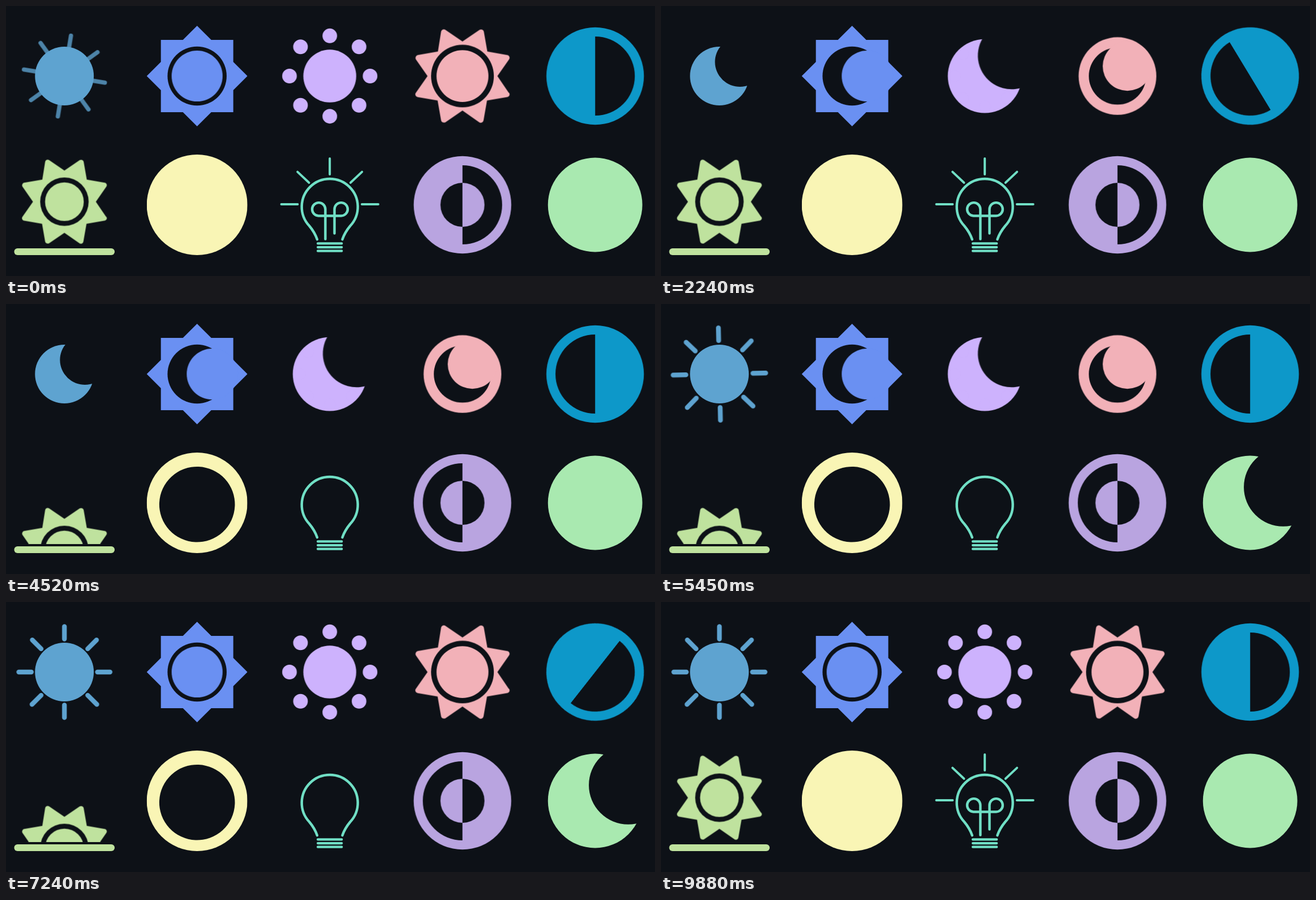
Write an HTML page that moves like this. It is 1147x478 px and loops after 10000 ms.

```html
<!DOCTYPE html>
<html lang="en">
<head>
<meta charset="utf-8">
<title>Theme toggles</title>
<style>
  html, body { margin: 0; width: 100%; height: 100%; overflow: hidden; background: #0d1117; }
  svg { display: block; fill: currentColor; }

  /* Each icon switches on at 0% of its own cycle and off at 50.2%. */
  .icon { --lead: 22ms; --ease: ease; }
  .icon * { transform-origin: 16px 16px; }
  .swap, .early, .late, .grow, .shade, .draw {
    animation: swap 10s var(--ease) calc(var(--i) * 500ms - 10s - var(--lead)) infinite;
  }
  .early { animation-name: early; }
  .late { animation-name: late; }
  .grow { animation-name: grow; }
  .shade { animation-name: shade; }
  .draw { animation-name: draw; }

  @keyframes swap {
    0%, 55.2%, 100% { transform: var(--off, none); }
    5%, 50.2% { transform: var(--on); }
  }
  @keyframes early {
    0%, 51.2%, 55.2%, 100% { transform: none; opacity: 1; }
    0% { transform: none; opacity: 1; }
    4%, 50.2% { transform: var(--on); opacity: 0; }
    51.2% { transform: var(--on); opacity: 0; }
  }
  @keyframes late {
    0%, 1%, 54.2%, 100% { transform: none; }
    5%, 50.2% { transform: var(--on); }
  }
  @keyframes grow {
    0%, 55.2%, 100% { transform: none; }
    3.25%, 51.95% { transform: var(--on); }
  }
  @keyframes shade {
    0%, 2%, 53.2%, 100% { transform: none; }
    5%, 50.2% { transform: var(--on); }
  }
  @keyframes draw {
    0%, 55.2%, 100% { stroke-dashoffset: 0; }
    5%, 50.2% { stroke-dashoffset: 1.05; }
  }

  .classic { --lead: 15ms; --ease: cubic-bezier(0, 0, .15, 1.25); }
  .expand { --ease: cubic-bezier(0, 0, 0, 1.25); }
  .expand .shade { --ease: cubic-bezier(0, 0, .5, 1); }
  .hole { fill: #0d1117; }
  .line { fill: none; stroke: currentColor; stroke-linecap: round; stroke-linejoin: round; }
  .draw { stroke-dasharray: 1 2; }
</style>
</head>
<body>
<svg width="1147" height="478" viewBox="0 0 1147 478">
  <defs>
    <path id="star" d="M30.7 21.3 27.1 16l3.7-5.3c.4-.5.1-1.3-.6-1.4l-6.3-1.1-1.1-6.3c-.1-.6-.8-.9-1.4-.6L16 5l-5.4-3.7c-.5-.4-1.3-.1-1.4.6l-1 6.3-6.4 1.1c-.6.1-.9.9-.6 1.4L4.9 16l-3.7 5.3c-.4.5-.1 1.3.6 1.4l6.3 1.1 1.1 6.3c.1.6.8.9 1.4.6l5.4-3.7 5.3 3.7c.5.4 1.3.1 1.4-.6l1.1-6.3 6.3-1.1c.8-.1 1.1-.8.7-1.4z"/>
    <clipPath id="classic-cut"><path class="late classic" style="--i:0; --on:translate(-12px,10px)" d="M0-5h30a1 1 0 0 0 9 13v24H0Z"/></clipPath>
    <clipPath id="expand-cut"><path class="shade" style="--i:2; --lead:22ms; --ease:cubic-bezier(0,0,.5,1); --on:translate(-9px,14px)" d="M0-11h25a1 1 0 0 0 17 13v30H0Z"/></clipPath>
    <clipPath id="horizon-cut"><path d="M0 0h32v29H0z"/></clipPath>
    <clipPath id="eclipse-cut"><path class="swap" style="--i:6; --lead:22ms; --ease:ease; --on:translate(-32px,0px)" d="M0 0h64v32H0zm36 16a1 1 0 0 0 24 1 1 1 0 0 0-24-1"/></clipPath>
    <clipPath id="simple-cut"><path class="swap" style="--i:9; --lead:22ms; --ease:ease; --on:translate(-18px,4px)" d="M0-5h55v37H0zm32 12a1 1 0 0 0 25 0 1 1 0 0 0-25 0"/></clipPath>
  </defs>

  <svg class="icon classic" style="--i:0; color:#5ea3d0" x="14.2" y="35" width="178" height="178" viewBox="0 0 32 32">
    <g clip-path="url(#classic-cut)">
      <circle cx="16" cy="16" r="9.34"/>
      <path class="line early" style="--on:scale(.5) rotate(45deg)" stroke-width="1.5" d="M16 5.5v-4M16 30.5v-4M1.5 16h4M26.5 16h4M23.4 8.6l2.8-2.8M5.7 26.3l2.9-2.9M5.8 5.8l2.8 2.8M23.4 23.4l2.9 2.9"/>
    </g>
  </svg>

  <svg class="icon" style="--i:1; color:#6a90f2" x="248.7" y="35" width="178" height="178" viewBox="0 0 32 32">
    <path d="M27.5 11.5v-7h-7L16 0l-4.5 4.5h-7v7L0 16l4.5 4.5v7h7L16 32l4.5-4.5h7v-7L32 16z"/>
    <circle class="hole" cx="16" cy="16" r="9.39"/>
    <circle class="swap" style="--on:translateX(4.8px)" cx="16" cy="16" r="8.1"/>
  </svg>

  <svg class="icon expand" style="--i:2; color:#cdb2fd" x="483.2" y="35" width="178" height="178" viewBox="0 0 32 32">
    <g clip-path="url(#expand-cut)">
      <circle class="grow" style="--on:scale(1.4)" cx="16" cy="16" r="8.4"/>
      <path class="line grow" style="--on:scale(.75)" stroke-width="4.65" d="M16 3.2h0M16 28.8h0M3.2 16h0M28.8 16h0M6.7 6.7h0M25.3 6.7h0M6.7 25.3h0M25.3 25.3h0"/>
    </g>
  </svg>

  <svg class="icon" style="--i:3; color:#f2b1b8" x="717.7" y="35" width="178" height="178" viewBox="0 0 32 32">
    <use href="#star" class="swap" style="--on:scale(.75)"/>
    <circle class="swap" style="--off:scale(.8); --on:scale(1)" cx="16" cy="16" r="12.35"/>
    <circle class="hole swap" style="--on:scale(.912)" cx="16" cy="16" r="9.97"/>
    <circle class="swap" style="--on:translate(3.15px,-3.15px) scale(.95)" cx="16" cy="16" r="8.25"/>
  </svg>

  <svg class="icon" style="--i:4; color:#0d98c9" x="952.2" y="35" width="178" height="178" viewBox="0 0 32 32">
    <path class="swap" style="--on:rotate(180deg)" d="M16 .5a15.5 15.5 0 0 0 0 31 15.5 15.5 0 0 0 0-31zm0 28.1V3.4a12.6 12.6 0 0 1 0 25.2z"/>
  </svg>

  <svg class="icon" style="--i:5; color:#bfe29e" x="14.2" y="263" width="178" height="178" viewBox="0 0 32 32">
    <g clip-path="url(#horizon-cut)">
      <g class="swap" style="--on:translateY(16px)">
        <g transform="translate(1.6 .6) scale(.9)" style="transform-origin:0 0"><use href="#star"/></g>
        <circle class="hole" cx="16" cy="15" r="7.7"/>
        <circle cx="16" cy="15" r="6.15"/>
      </g>
    </g>
    <path class="line" stroke-width="2.15" d="M1.1 30.92h29.8"/>
  </svg>

  <svg class="icon" style="--i:6; color:#f9f5b5" x="248.7" y="263" width="178" height="178" viewBox="0 0 32 32">
    <g clip-path="url(#eclipse-cut)"><circle cx="16" cy="16" r="16"/></g>
  </svg>

  <svg class="icon" style="--i:7; color:#70dfc5" x="483.2" y="263" width="178" height="178" viewBox="0 0 32 32">
    <g class="line" stroke-width=".8">
      <path d="M12 27c-.6-1.7-1.5-3.1-2.5-4.3A8.9 8.9 0 1 1 22.5 22.7C21.5 23.9 20.6 25.3 20 27"/>
      <path stroke-width=".75" d="M12.2 28.3h7.6M12.2 29.5h7.6M12.2 30.68h7.6"/>
      <path class="draw" pathLength="1" d="M14.6 26.9V17.4a2.1 2.1 0 1 0-2.2 2.1h7.2a2.1 2.1 0 1 0-2.1-2.1V26.9"/>
      <g stroke-width=".72">
        <path class="draw" pathLength="1" d="M5.8 15.8H.6"/>
        <path class="draw" pathLength="1" d="M9.4 8.95 5.75 5.5"/>
        <path class="draw" pathLength="1" d="M16 6.3V1.25"/>
        <path class="draw" pathLength="1" d="M22.6 8.95 26.25 5.5"/>
        <path class="draw" pathLength="1" d="M26.2 15.8h5.2"/>
      </g>
    </g>
  </svg>

  <svg class="icon" style="--i:8; color:#b9a4e0" x="717.7" y="263" width="178" height="178" viewBox="0 0 32 32">
    <path class="swap" style="--on:rotate(180deg)" d="M16 9a7 7 0 0 1 0 14z"/>
    <path class="swap" style="--on:rotate(-180deg)" d="M16 .5a15.5 15.5 0 0 0 0 31 15.5 15.5 0 0 0 0-31zm0 28.1V23a7 7 0 0 1 0-14V3.4a12.6 12.6 0 0 1 0 25.2z"/>
  </svg>

  <svg class="icon" style="--i:9; color:#a9e9b0" x="952.2" y="263" width="178" height="178" viewBox="0 0 32 32">
    <g clip-path="url(#simple-cut)"><circle cx="16" cy="16" r="15"/></g>
  </svg>
</svg>
</body>
</html>
```
